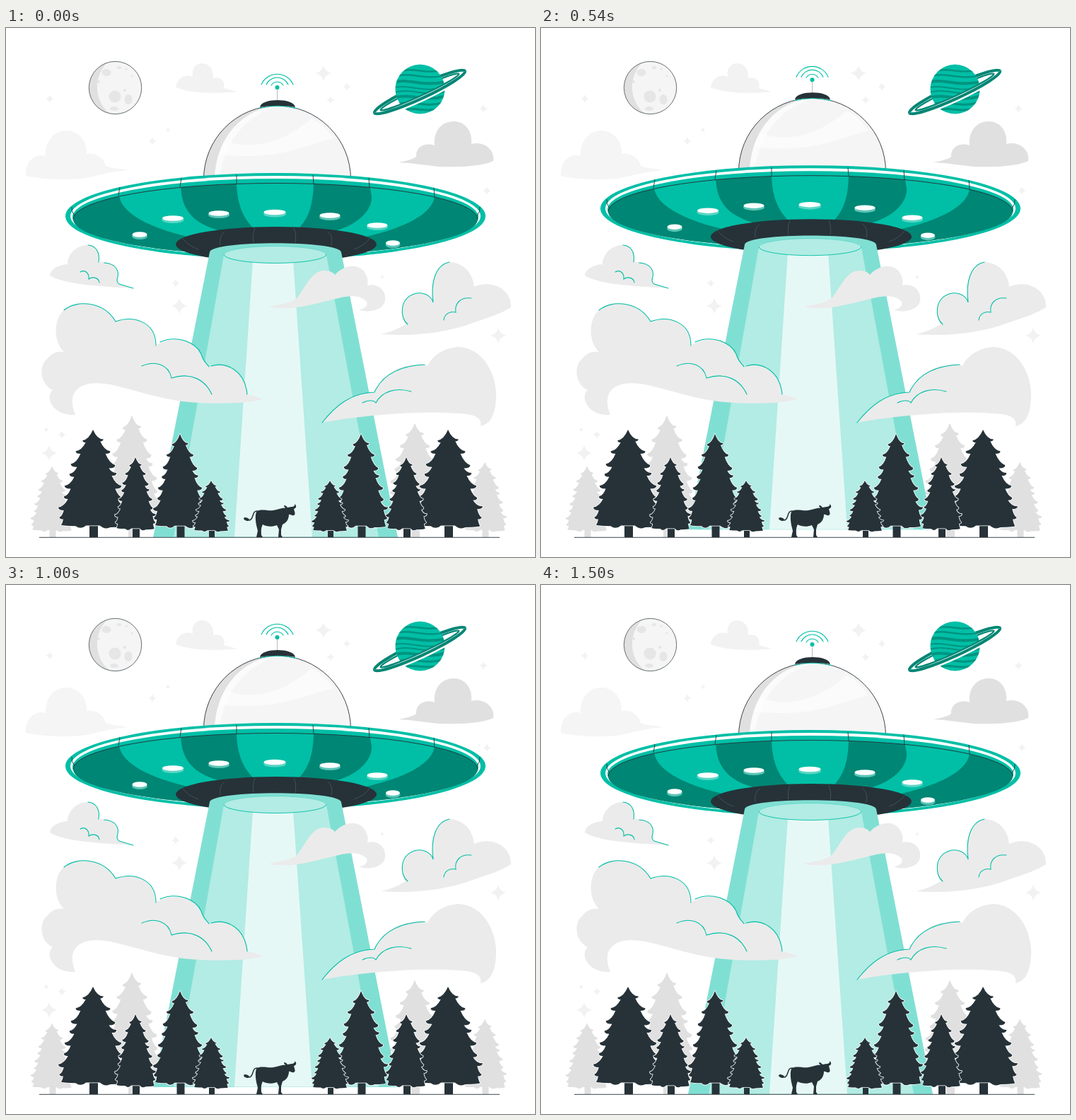
An HTML page for the animation above (1.54 s loop, 748x748 px).

```html
<!DOCTYPE html>
<html lang="en">
<head>
<meta charset="utf-8">
<title>Saucer over the forest</title>
<style>
html, body { margin: 0; overflow: hidden; background: #fff; }
svg { display: block; width: 100vw; height: 100vh; }
.main { fill: #00bfa6; }
.deep { fill: #008674; }
.ink { fill: #263238; }
.mid { fill: #e0e0e0; }
.cloud { fill: #ebebeb; }
.pale { fill: #f5f5f5; }
.white { fill: #fff; }
.line { fill: none; stroke: #00bfa6; stroke-width: 1.1; stroke-linecap: round; }
.seam { fill: none; stroke: #263238; stroke-width: .9; }
.glow { fill: #80dfd3; }
.glow2 { fill: #b2ece4; }
.glow3 { fill: #e6f8f6; }
</style>
</head>
<body>
<svg viewBox="0 0 748 748">
  <defs>
    <clipPath id="planetClip"><circle cx="585.5" cy="86.5" r="35"/></clipPath>
    <clipPath id="frontClip"><rect x="-80" y="0" width="160" height="20"/></clipPath>
    <clipPath id="moonClip"><circle cx="154.5" cy="84.5" r="37"/></clipPath>
    <clipPath id="hullClip"><ellipse cx="381" cy="270.5" rx="286" ry="51"/></clipPath>
    <clipPath id="domeClip"><circle cx="383.5" cy="214" r="104"/></clipPath>
    <g id="ring" fill="none" stroke="#008674">
      <ellipse rx="70" ry="10" stroke="#fff" stroke-width="8"/>
      <ellipse rx="70.5" ry="9.5" stroke-width="4"/>
      <ellipse rx="61" ry="5.5" stroke-width="2.2"/>
    </g>
  </defs>

  <g id="stars" class="pale" style="fill:#f2f2f2"></g>

  <g id="moon">
    <circle class="pale" cx="154.5" cy="84.5" r="37"/>
    <g clip-path="url(#moonClip)" class="mid">
      <path d="M146 46C110 55 104 112 150 123C128 110 118 72 146 46Z"/>
      <g opacity=".75">
        <ellipse cx="142" cy="63" rx="6.5" ry="5"/>
        <circle cx="154" cy="97" r="8.5"/>
        <ellipse cx="173" cy="101" rx="5.5" ry="7"/>
        <ellipse cx="153" cy="114" rx="6" ry="3"/>
        <ellipse cx="160" cy="56" rx="3" ry="2"/>
        <circle cx="168" cy="88" r="2"/>
        <circle cx="131" cy="76" r="2"/>
        <circle cx="170" cy="58" r="1.5"/>
        <circle cx="178" cy="68" r="1.5"/>
      </g>
    </g>
    <circle class="seam" cx="154.5" cy="84.5" r="37.2" style="stroke-width:.7"/>
  </g>

  <g id="planet">
    <use href="#ring" transform="translate(585 90.5) rotate(-24.8)"/>
    <circle class="main" cx="585.5" cy="86.5" r="35"/>
    <g clip-path="url(#planetClip)" fill="none" stroke="#008674" opacity=".75">
      <path stroke-width="2.5" d="M562 60C580 56 592 66 618 59M556 67C575 63 590 74 622 67"/>
      <path stroke-width="4" d="M548 77C570 70 585 84 622 76M548 99C572 91 590 106 622 96"/>
      <path stroke-width="2" d="M549 84C568 79 588 92 622 84M549 91C574 84 592 98 622 90"/>
      <path stroke-width="3" d="M554 108C575 101 592 114 620 105M564 116C580 111 592 120 612 114"/>
    </g>
    <g transform="translate(585 90.5) rotate(-24.8)"><use href="#ring" clip-path="url(#frontClip)"/></g>
  </g>

  <g id="farClouds">
    <path fill="#f2f2f2" d="M240 84C241 72 253 64 264 69C262 58 268 50 277 50C287 50 294 58 293 71C303 68 311 76 308 85C314 87 320 88 327 90C300 93 262 93 240 84Z"/>
    <path class="pale" d="M28 209C27 190 40 176 56 181C55 160 68 145 85 145C103 145 115 160 114 178C127 175 139 185 141 195C150 199 160 198 172 201C150 203 130 208 114 212C85 216 50 214 28 209Z"/>
    <path class="mid" d="M555 190C565 188 575 186 580 182C579 170 590 161 606 166C604 146 616 132 633 132C650 132 660 147 658 164C675 159 692 172 689 188C672 196 640 197 612 196C592 194 575 191 555 190Z"/>
  </g>
  <g id="farTrees" class="mid"></g>

  <g id="saucer">
    <path class="line" d="M361 80A24.5 24.5 0 0 1 406 80M368 80A17 17 0 0 1 399 80M375 81A10 10 0 0 1 392 81"/>
    <path stroke="#b5babd" d="M383.5 84V103"/>
    <circle class="main" cx="383.5" cy="84" r="3"/>

    <circle class="pale" cx="383.5" cy="214" r="104"/>
    <g clip-path="url(#domeClip)">
      <path fill="#fbfbfb" d="M298 155C340 174 385 168 432 128C445 134 455 144 463 156C425 164 385 190 296 178Z"/>
      <path class="mid" d="M278 214V108H384C330 116 297 158 295 214Z"/>
      <path class="white" d="M295 214C297 158 330 116 384 111C340 123 308 160 302 214Z" opacity=".6"/>
    </g>
    <circle class="seam" cx="383.5" cy="214" r="104"/>
    <path class="line" d="M358 113.500Q384 107 410 113.500"/>
    <path class="ink" d="M359 112C360 105 372 102 384 102C396 102 408 105 409 112C392 109 376 109 359 112Z"/>

    <ellipse class="main" cx="381" cy="266" rx="297" ry="61"/>
    <ellipse class="white" cx="381" cy="266" rx="290" ry="57"/>
    <ellipse class="main" cx="381" cy="267.500" rx="287" ry="54.500"/>
    <ellipse class="deep" cx="381" cy="270.500" rx="286" ry="51"/>
    <g clip-path="url(#hullClip)" class="main">
      <path d="M160 215V236C162 262 205 284 262 296L300 286C262 275 246 255 247 215Z"/>
      <path d="M326 215C326 245 333 268 352 285H412C430 268 435 245 435 215Z"/>
      <path d="M606 215V238C603 264 560 284 505 296L468 286C502 276 518 255 517 238L513 215Z"/>
    </g>
    <path class="seam" d="M95 270.500A286 51 0 0 1 667 270.500"/>
    <path class="seam" d="M161 225L159 237M248 212L246 225M326 208V220M434 208L435 220M513 212L514 226M605 226L606 239M93 253Q92 259 97 266M670 253Q671 259 666 266"/>
    <g id="lamps"></g>

    <ellipse class="ink" cx="382" cy="306" rx="142" ry="25"/>
    <path fill="none" stroke="#455a64" stroke-width=".8" d="M250 298Q258 308 272 313M309 288Q301 294 303 307M352 283Q348 292 350 304M407 283Q411 292 409 304M455 288Q463 294 460 307M514 298Q506 308 492 313"/>

    <path class="glow" d="M288 317C290 300 472 300 474 317L554 720H208Z"/>
    <path class="glow2" d="M308 321H453L527 719.500H237Z"/>
    <path class="glow3" d="M349 329H406L433 719.500H323Z"/>
    <ellipse class="glow2" cx="380.500" cy="320.500" rx="72.500" ry="12"/>
    <path class="line" style="stroke-width:.9" d="M308 320.500A72.500 12 0 0 0 453 320.500"/>
    <path class="line" style="stroke-width:.6" opacity=".55" d="M308 320.500A72.500 12 0 0 1 453 320.500"/>
  </g>

  <g id="nearClouds" class="cloud">
    <path d="M62 350C63 341 73 335 87 334C87 320 100 307 115 307C127 307 133 317 131 331C146 329 160 336 158 352C156 357 157 360 160 362L180 368C140 365 85 364 62 350Z"/>
    <path d="M530 433C545 430 552 426 565 419C557 409 559 383 577 376C589 372 601 378 604 390C600 360 607 332 630 331C650 334 660 348 662 366C688 355 715 370 714 395C698 405 680 410 660 417C620 432 575 436 530 433Z"/>
    <path d="M98 547C80 548 66 540 62 526C61 520 62 516 66 512C48 504 46 478 58 468C66 458 74 457 82 458C68 445 68 420 76 406C90 385 118 385 138 398C147 404 152 410 155 415C180 406 212 415 211 449C240 432 268 443 276 461C279 472 284 474 287 479C310 470 338 483 341 518C350 520 358 522 363 525C340 532 290 532 250 528C205 522 165 506 140 503C115 500 97 506 94 524C93 535 96 541 98 547Z"/>
    <path d="M372 394C390 390 404 389 412 381C424 366 432 343 450 343C458 343 463 346 465 349C478 334 500 332 508 347C512 354 512 360 511 364C530 360 540 376 535 389C529 401 508 403 499 398C508 397 512 392 510 387C503 379 490 377 470 382C440 389 400 402 372 394Z"/>
    <path d="M447 558C465 535 487 516 521 515C530 495 550 478 578 476C588 474 594 476 596 478C604 460 625 451 641 451C672 453 694 485 693 522C692 545 686 560 671 563C674 550 660 546 640 545C580 541 500 548 447 558Z"/>
  </g>
  <g class="line">
    <path d="M116 307C128 308 133 318 131 331M139 332C155 333 160 343 158 352C156 357 157 360 160 362L180 368"/>
    <path d="M105 345C112 341 118 347 117 355C123 351 131 353 132 360"/>
    <path d="M568 419C556 409 557 383 577 376C589 372 601 378 604 388C600 358 608 335 627 331"/>
    <path d="M619 413C620 404 628 400 636 402C634 390 642 380 658 382"/>
    <path d="M82 399C100 384 138 386 155 415C180 406 212 415 212 449M218 444C240 434 268 443 276 461C279 472 284 474 287 479M290 478C312 471 338 485 341 518"/>
    <path d="M192 478C210 470 230 475 234 495C262 486 282 498 291 518"/>
    <path d="M447 558C465 535 487 516 521 515C530 495 550 478 592 476"/>
    <path d="M504 530C514 525 521 527 523 530C532 513 552 508 573 514"/>
  </g>

  <path class="seam" d="M47 720.300H698"/>
  <g id="trees" class="ink" stroke="#fff" stroke-width=".9" stroke-linejoin="round"></g>

  <g id="cow" class="ink">
    <path d="M354 684C360 679 368 683 378 682C386 681 390 678 395 679L393 676C393 674 396 675 398 678L404 677C407 677 409 675 408 673C412 676 410 679 407 680C408 684 410 688 407 689C404 690 402 687 400 688C400 695 396 700 391 702L389 709L389 717L391 720H385L386 709L383 703C376 706 368 705 363 702C360 708 361 712 361 717L363 720H354L356 711L354 703C353 697 352 690 354 684Z"/>
    <path fill="none" stroke="#263238" stroke-width="1.500" d="M356 683C349 682 350 690 347 694C345 697 342 696 339 694"/>
    <ellipse cx="340" cy="694.500" rx="4" ry="2" transform="rotate(20 340 694.500)"/>
  </g>
</svg>

<script>
const byId = id => document.getElementById(id);

// x, y, radius
const stars = [[449, 64, 11], [482, 83, 6], [459, 102, 6], [675, 114, 6], [680, 230, 6],
  [62, 100, 6], [207, 160, 6], [229, 144, 3.5], [240, 361, 6], [245, 393, 11],
  [696, 435, 11], [532, 352, 3], [61, 601, 11], [79, 575, 6], [57, 568, 3.5]];
byId('stars').innerHTML = stars.map(([x, y, r]) => {
  const k = r * 0.2;
  return `<path d="M${x} ${y - r}Q${x + k} ${y - k} ${x + r} ${y}Q${x + k} ${y + k} ${x} ${y + r}` +
    `Q${x - k} ${y + k} ${x - r} ${y}Q${x - k} ${y - k} ${x} ${y - r}Z"/>`;
}).join('');

// x, y, half width
const lamps = [[189, 292, 11], [236, 269, 15.5], [301, 262, 15], [380, 260.5, 16],
  [458, 265, 15], [525, 279, 15], [547, 304, 10.5]];
byId('lamps').innerHTML = lamps.map(([x, y, r]) =>
  `<ellipse class="glow" opacity=".7" cx="${x}" cy="${y + 2.5}" rx="${r}" ry="4.5"/>` +
  `<ellipse class="white" cx="${x}" cy="${y}" rx="${r - 0.5}" ry="3.8"/>`).join('');

// Branch tip and the notch below it, as shares of half width and height.
const branches = [[.3, .11, .21, .13], [.5, .22, .36, .245], [.64, .35, .46, .38],
  [.68, .45, .54, .48], [.82, .57, .64, .60], [.84, .68, .72, .705],
  [1, .79, .84, .82], [.97, .89, .86, .91], [.92, .965, .5, .98]];

function tree(x, top, halfWidth, bottom, trunk) {
  const height = bottom - top;
  const side = dir => {
    const at = (u, v) => `${(x + dir * u * halfWidth).toFixed(1)} ${(top + v * height).toFixed(1)}`;
    let u0 = 0, v0 = 0, d = `M${at(0, 0)}`;
    branches.forEach(([u, v, nu, nv], i) => {
      const shift = dir > 0 ? 0.012 * (i % 3 - 1) : 0;
      d += `Q${at(u0 + (u - u0) * .4, v0 + (v - v0) * .9)} ${at(u, v + shift)}`;
      d += `Q${at(u, nv + shift)} ${at(nu, nv + shift)}`;
      [u0, v0] = [nu, nv + shift];
    });
    return d + `Q${at(.35, 1.02)} ${at(.2, .975)}L${at(0, .975)}`;
  };
  const right = side(1), left = side(-1);
  return `<rect x="${x - trunk + 1}" y="${bottom - 8}" width="${trunk * 2}" height="${728 - bottom}" stroke="none"/>` +
    `<path stroke-width="1.600" d="${right}Z${left}Z"/><path stroke="none" d="${right}Z${left}Z"/>`;
}

byId('farTrees').innerHTML = [[178, 548, 43, 702, 6], [65, 620, 30, 712, 4.5],
  [578, 559, 42, 702, 6], [677, 614, 31, 712, 4.5]].map(t => tree(...t)).join('');
byId('trees').innerHTML = [[123, 568, 49, 707, 6], [625, 568, 49, 707, 6],
  [183, 607, 29, 710, 5], [566, 607, 29, 710, 5], [246, 574, 38, 707, 5.5],
  [502, 574, 38, 707, 5.5], [290, 640, 26, 712, 4], [458, 640, 26, 712, 4]]
  .map(t => tree(...t)).join('');

const LOOP = 1540, FLIGHT = 1500, LIFT = 15;
const saucer = byId('saucer');

function draw() {
  const phase = Math.min(performance.now() % LOOP / FLIGHT, 1);
  const y = -LIFT * (1 - Math.abs(1 - 2 * phase));
  saucer.setAttribute('transform', `translate(0 ${y.toFixed(2)})`);
  requestAnimationFrame(draw);
}
draw();
</script>
</body>
</html>
```
